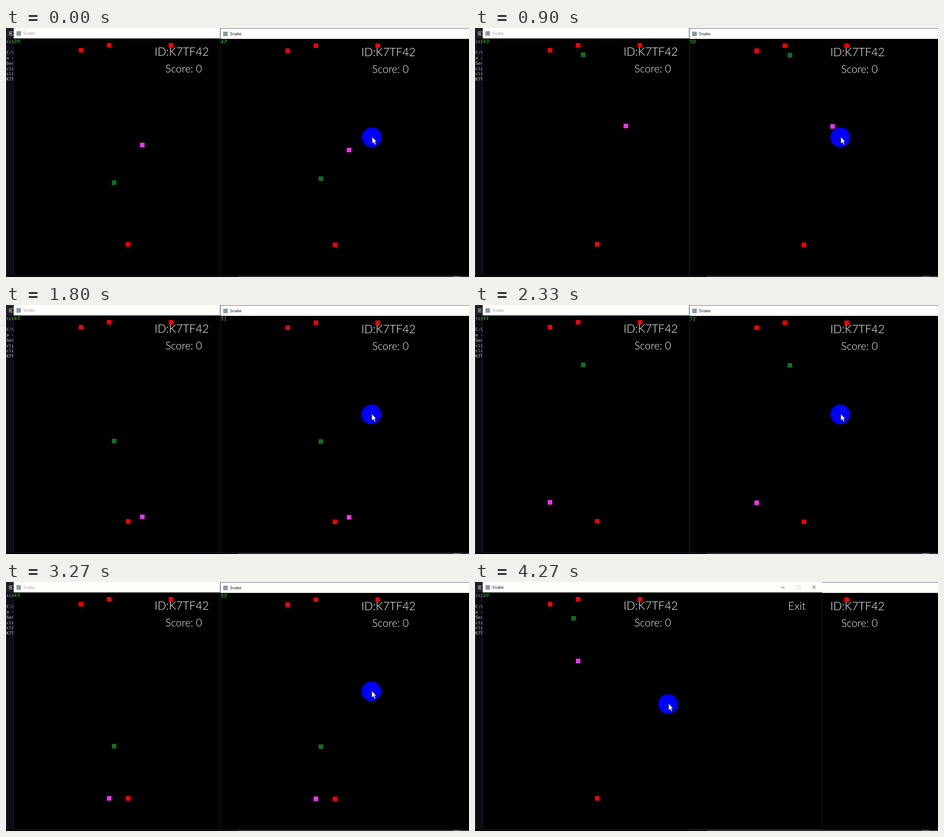
Recreate the animation shown at these times as an HTML page with a canvas. Size 1019 by 549 pixels, loop 4.31 s.

```html
<!DOCTYPE html>
<html lang="en">
<head>
<meta charset="utf-8">
<title>Snake</title>
<style>
  html, body { margin: 0; width: 100%; height: 100%; overflow: hidden; background: #000; }
  canvas { display: block; }
</style>
</head>
<body>
<canvas id="stage" width="1019" height="549"></canvas>
<script>
const ctx = document.getElementById('stage').getContext('2d');
const LOOP = 4310, CELL = 10.45, ROWS = 50;
const PLAYER = 'K7TF42';
const FOCUS_FRAME = 118;   // the left window is clicked to the front
const LOST_TICK = 120;     // the game skips one tick here
const FOOD = [[0, 1], [6, 0], [19, 0], [10, 42]];
const STEP = { U: [0, -1], D: [0, 1], L: [-1, 0], R: [1, 0] };
const SNAKES = [
  { color: '#11701f', start: [7, 29], moves: 'U125 L2' },
  { color: '#f033f0', start: [13, 21], moves: 'D1 R11 U6 L8 D25 L16 U6 R9 D10 L3 U32' }
];
const POINTER = [[0, 805, 241], [16, 804.5, 241], [30, 804, 241], [101, 804, 241],
                 [111, 443, 277], [112, 443, 277], [117, 425, 269]];

function rect(color, x, y, w, h) {
  ctx.fillStyle = color;
  ctx.fillRect(x, y, w, h);
}

function text(string, x, y, font, color) {
  ctx.font = font;
  ctx.fillStyle = color;
  ctx.fillText(string, x, y);
}

function line(color, ...points) {
  ctx.strokeStyle = color;
  ctx.lineWidth = 1;
  ctx.beginPath();
  points.forEach(([x, y], i) => i ? ctx.lineTo(x, y) : ctx.moveTo(x, y));
  ctx.stroke();
}

function snakeCell({ start, moves }, tick) {
  let [col, row] = start;
  for (const move of moves.split(' ')) {
    const count = Math.min(tick, +move.slice(1));
    col += STEP[move[0]][0] * count;
    row += STEP[move[0]][1] * count;
    tick -= count;
  }
  return [col, ((row + 1) % ROWS + ROWS) % ROWS - 1];
}

function cell(color, [col, row]) {
  rect(color, Math.round(159.6 + col * CELL), Math.round(33.4 + row * CELL), 10, 10);
}

function gameWindow(dx, dy, tick, fps, active) {
  ctx.save();
  ctx.translate(dx, dy);
  rect('#25252d', 16, 0, 748, 546);
  rect('#000', 17, 23, 746, 522);
  rect('#fffffc', 17, 0, 747, 23);
  rect('#8b9aa8', 23, 7, 10, 10);
  text('Snake', 38, 15, '9px "Open Sans", sans-serif', active ? '#000' : '#999');
  line('#222', [674, 12.5], [682, 12.5]);
  ctx.strokeStyle = '#ccc';
  ctx.strokeRect(708.5, 8.5, 7, 7);
  line('#222', [742.5, 8], [749.5, 15]);
  line('#222', [749.5, 8], [742.5, 15]);

  FOOD.forEach(place => cell('#f00', place));
  SNAKES.forEach(snake => cell(snake.color, snakeCell(snake, tick)));

  const label = (string, x, y, size) =>
    text(string, x, y, `300 ${size}px Lato, sans-serif`, '#fff');
  label('ID:' + PLAYER, 327, 61, 25);
  label('Score: 0', 351, 98, 23);
  label('Exit', 689, 61, 24);
  text(fps, 17, 33, 'italic 12px Lato, sans-serif', '#2fe52f');
  ctx.restore();
}

function consoleWindow() {
  rect('#0b0b12', 0, 0, 17, 546);
  rect('#202024', 0, 0, 17, 23);
  rect('#3a3a48', 0, 23, 1, 523);
  ctx.strokeStyle = '#ddd';
  ctx.strokeRect(7.5, 8.5, 9, 7);
  rect('#ddd', 9, 11, 4, 2);
  const lines = ['(c)', '', 'C:\\', 'a -', 'Ser', 'cli', 'cli', PLAYER.slice(0, 3)];
  lines.forEach((string, i) =>
    text(string, 1, 33 + i * 11.9, '9px "DejaVu Sans Mono", monospace', '#ccc'));
}

function pointer(frame) {
  let i = POINTER.length - 1;
  while (POINTER[i][0] > frame) i--;
  const [f0, x0, y0] = POINTER[i];
  const [f1, x1, y1] = POINTER[i + 1] || [f0 + 1, x0, y0];
  const p = Math.min(1, (frame - f0) / (f1 - f0));
  const ease = p * p * (3 - 2 * p);
  ctx.save();
  ctx.translate(x0 + (x1 - x0) * ease, y0 + (y1 - y0) * ease);
  ctx.fillStyle = '#00f';
  ctx.beginPath();
  ctx.arc(0, 0, 21.7, 0, Math.PI * 2);
  ctx.fill();
  const arrow = new Path2D('M1 -1V14L4.4 11L7 16.5L9.4 15.4L6.8 10H11Z');
  ctx.fillStyle = '#fff';
  ctx.fill(arrow);
  ctx.strokeStyle = '#000';
  ctx.lineWidth = 0.7;
  ctx.stroke(arrow);
  ctx.restore();
}

function draw(now) {
  const time = now % LOOP;
  const frame = Math.floor((Math.floor(time / 10) * 10 + 4) * 0.03);
  const tick = frame < LOST_TICK ? frame : frame - 1;
  const leftFps = [39, 43, 41, 45, 39][Math.floor((time + 100) / 1000)];
  const rightFps = [47, 50, 51, 53, 51][Math.floor((time + 400) / 1000)];
  const leftActive = frame >= FOCUS_FRAME;
  const left = () => gameWindow(0, 0, tick, leftFps, leftActive);
  const right = () => gameWindow(455, 1, Math.max(1, tick), rightFps, !leftActive);

  rect('#000', 0, 0, 1019, 549);
  rect('#29292d', 510, 547, 509, 2);
  rect('#66645c', 984, 547, 16, 2);
  consoleWindow();
  rect('#55555f', 764, 0, 255, 1);
  if (leftActive) { right(); left(); }
  else { left(); rect('#55555f', 471, 0, 293, 1); right(); }
  pointer(frame);
}

const startTime = performance.now();
function loop() {
  draw(performance.now() - startTime);
  requestAnimationFrame(loop);
}
loop();
</script>
</body>
</html>
```
